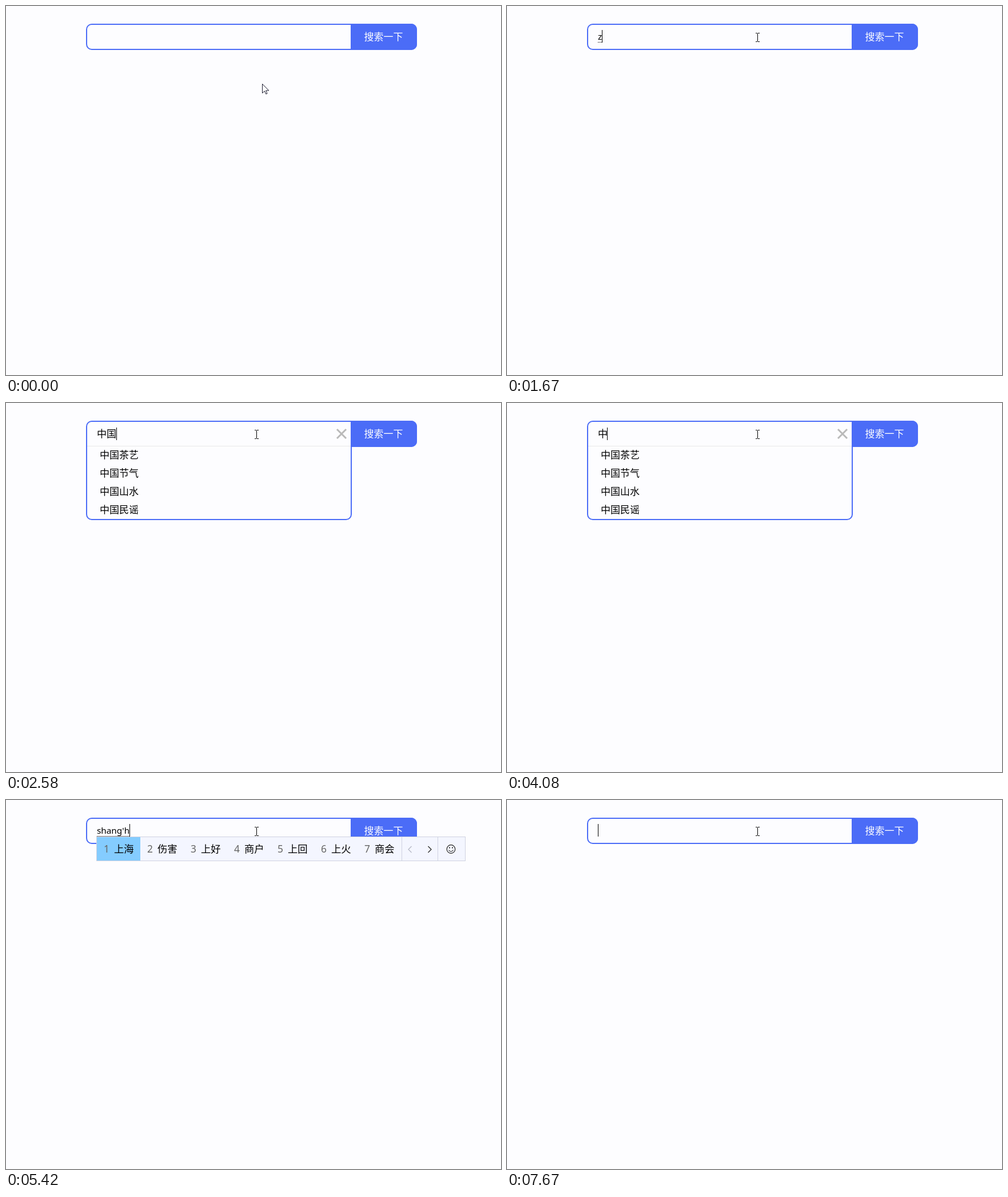
Recreate the animation shown at these times as an HTML page. Size 866 by 646 pixels, loop 8000 ms.

```html
<!DOCTYPE html>
<html lang="zh-CN">
<head>
<meta charset="utf-8">
<title>搜索框</title>
<style>
  :root { --blue: #4b6cf7; --page: #fdfdff; }
  html, body { margin: 0; width: 100%; height: 100%; overflow: hidden; background: var(--page); }
  body { position: relative; color: #000; font: 17px 'Noto Sans', 'Noto Sans CJK SC', sans-serif; }
  body > *, #clear { position: absolute; box-sizing: border-box; white-space: nowrap; }
  [hidden] { display: none !important; }

  #bar { left: 140px; top: 31px; width: 579px; height: 46px; border: 2px solid var(--blue); border-radius: 10px; }
  #go { left: 603px; top: 31px; width: 116px; height: 46px; border-radius: 0 10px 10px 0;
        background: var(--blue); color: #fff; line-height: 46px; text-align: center; text-indent: -1px; }

  #list { left: 140px; top: 64px; width: 465px; padding-top: 11px; background: var(--page);
          border: 2px solid var(--blue); border-top: 0; border-radius: 0 0 10px 10px; }
  #list::before { content: ''; position: absolute; left: 0; right: 0; top: 11px; height: 1px; background: #e8e8e8; }
  #list div { height: 32px; padding-left: 22px; line-height: 32px; }

  #text { left: 159px; top: 43px; height: 21px; line-height: 21px; }
  #text.typing { font-size: 15.3px; line-height: 20px; border-bottom: 1px dotted #000; }
  #caret { width: 1px; height: 22px; background: #000; }
  #clear { left: 577px; top: 44px; }

  #ime { left: 158px; top: 64px; height: 43px; display: flex; border: 1px solid #cfd2e0;
         background: #f4f6ff; font-size: 17.33px; line-height: 41px; }
  .cand { padding: 0 11.34px 0 12px; }
  .cand:first-child { background: #84ccff; }
  .cand i { display: inline-block; width: 18px; font-style: normal; color: #666; }
  #tools { width: 111px; margin-left: 1px; }
  svg { display: block; overflow: visible; fill: none; }
</style>
</head>
<body>
<div id="bar"></div>
<div id="go">搜索一下</div>
<div id="list" hidden></div>
<div id="text"></div>
<svg id="clear" width="20" height="20" stroke="#b9b9b9" stroke-width="3"><path d="M2 2 18 18M18 2 2 18"/></svg>
<div id="caret" hidden></div>
<div id="ime" hidden></div>
<svg id="arrow" width="12" height="19"><path d="M.5 .5V16.5L4.3 12.9 6.8 18.2 9 17.2 6.6 12H11.8Z" fill="#fff" stroke="#1c1c30"/></svg>
<svg id="beam" width="7" height="16" stroke="#000"><path d="M0 .5H3M4 .5H7M3.5 1V15M0 15.5H3M4 15.5H7"/></svg>

<script>
const LOOP = 8000, LEFT = 159;
const $ = id => document.getElementById(id);

const suggestions = {
  中: ['中国茶艺', '中国节气', '中国山水', '中国民谣'],
  上: ['上海天气', '上海市夜景', '上海人口'],
};

// time, text, caret shown, input-method candidates
const steps = [
  [0, '', 0],
  [580, '', 1],
  [1080, '', 0],
  [1580, '', 1],
  [1670, 'z', 1],
  [1750, 'zh', 1, '这 中 种 重 只 着 真'],
  [1830, 'zho', 1, '中 种 众 重 钟 忠 终'],
  [1920, 'zhog', 1, '这个 中国 整个 真够 找个 照顾 终归'],
  [2000, 'zhogn', 1, '中 种 众 重 钟 忠 终'],
  [2170, "zhogn'g", 1, '中国 中高 终归 中规 重构 种过 重过'],
  [2250, "zhogn'guo", 1, '中国 种过 重过 终过 中过 种果 众国'],
  [2580, '中国', 1],
  [3170, '中国', 0],
  [3670, '中国', 1],
  [4080, '中', 1],
  [4250, '中', 0],
  [4420, '', 0],
  [4750, '', 1],
  [4920, 's', 1],
  [5000, 'sh', 1, '是 上 时 说 事 十 使'],
  [5080, 'sha', 1, '啥 杀 沙 傻 煞 莎 厦'],
  [5170, 'shan', 1, '山 闪 善 单 删 扇 衫'],
  [5250, 'shang', 1, '上 商 伤 尚 赏 裳 晌'],
  [5420, "shang'h", 1, '上海 伤害 上好 商户 上回 上火 商会'],
  [5500, "shang'hai", 1, '上海 伤害 商海 上还 尚还 伤还 赏海'],
  [5750, '上海', 1],
  [6250, '上海', 0],
  [6580, '上', 0],
  [6750, '上', 1],
  [6830, '', 1],
  [7250, 'b', 1],
  [7330, 'b', 1, '不 把 被 本 比 吧 别'],
  [7670, '', 1],
];

const tools = `<svg id="tools" height="41" stroke="#222" stroke-width="1.2">
  <path d="M.5 0V41M63.5 0V41" stroke="#cfd2e0" stroke-width="1"/>
  <path d="M17.5 16 12 21.5 17.5 27" stroke="#b4b6c4"/>
  <path d="M46.5 16 52 21.5 46.5 27"/>
  <circle cx="86.5" cy="21" r="7.3"/>
  <path d="M82.5 22.5Q86.5 28 90.5 22.5"/>
  <path d="M83.9 17.6V19.6M89.1 17.6V19.6" stroke-width="1.8"/></svg>`;

const place = (el, x, y) => { el.style.left = x + 'px'; el.style.top = y + 'px'; };

function showStep([, text, caret, cands]) {
  const typing = /^[a-z]/.test(text);
  const items = suggestions[text[0]];
  const field = $('text');
  field.textContent = text;
  field.className = typing ? 'typing' : '';

  $('list').hidden = !items;
  $('clear').toggleAttribute('hidden', !items);
  if (items) $('list').innerHTML = items.map(s => `<div>${s}</div>`).join('');

  $('ime').hidden = !cands;
  if (cands) {
    $('ime').innerHTML = cands.split(' ')
      .map((c, i) => `<div class="cand"><i>${i + 1}</i>${c}</div>`).join('') + tools;
  }

  const x = typing ? LEFT + Math.round(field.getBoundingClientRect().width) : [LEFT, 175, 193][text.length];
  place($('caret'), x, items ? 43 : 42);
  $('caret').hidden = !caret;
}

// The pointer travels in seven discrete moves, easing in and out.
function showPointer(t) {
  const n = t < 80 ? 0 : Math.min(7, 1 + Math.floor((t - 79) / 83.4));
  const p = n / 7, e = p * p * (3 - 2 * p);
  const x = Math.round(448 - 10 * e), y = Math.round(136 - 81 * e);
  const inside = y < 76;
  $('arrow').toggleAttribute('hidden', inside);
  $('beam').toggleAttribute('hidden', !inside);
  place($('arrow'), x, y);
  place($('beam'), x - 3, y - 8);
}

const start = performance.now();
let shown;
function draw() {
  const t = (performance.now() - start) % LOOP;
  const step = steps.findLast(s => s[0] <= t) || steps[0];
  if (step !== shown) showStep(shown = step);
  showPointer(t);
  requestAnimationFrame(draw);
}
draw();
</script>
</body>
</html>
```
